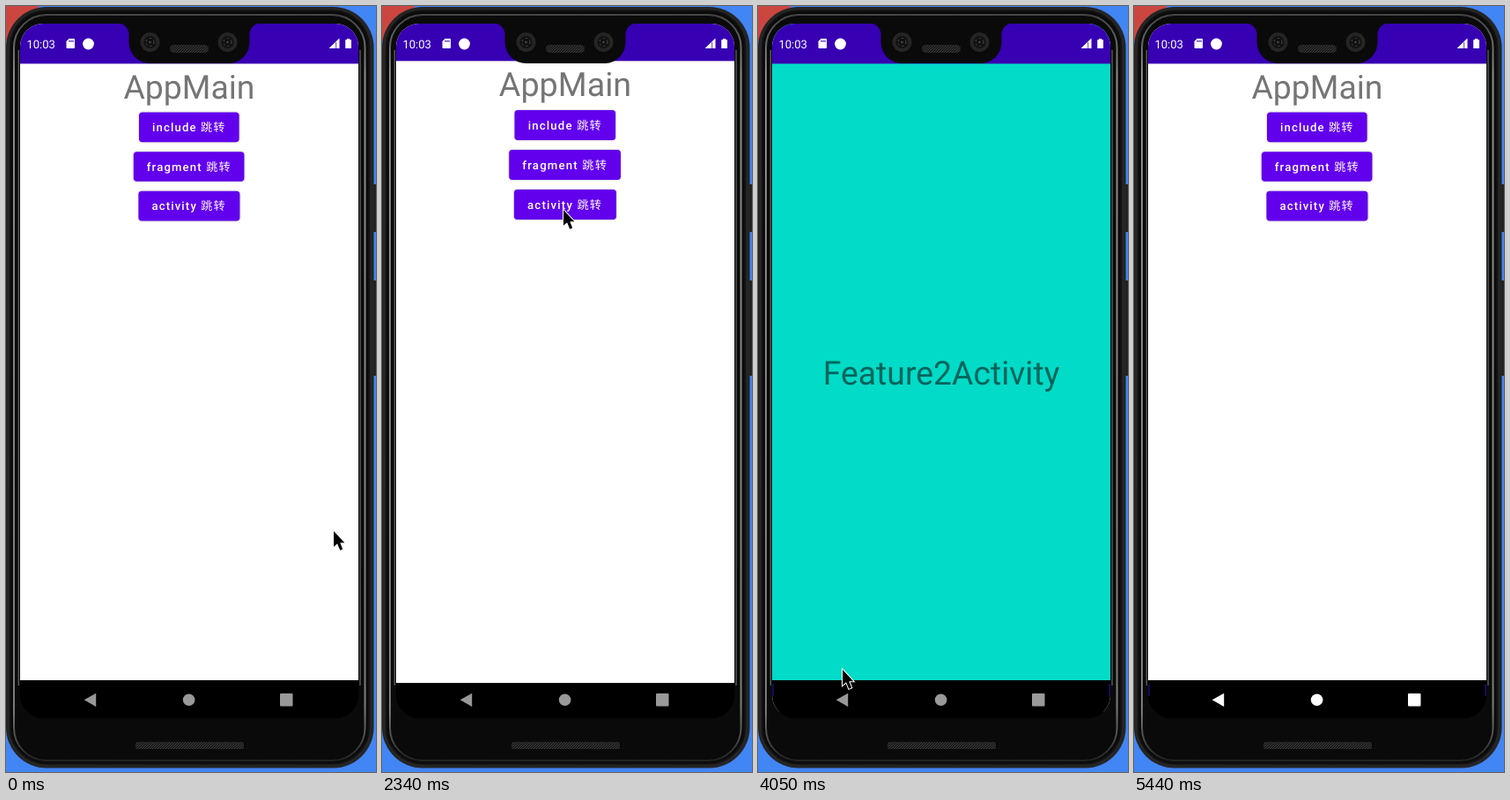
Recreate the animation shown at these times as an HTML page. Size 420 px wide and 868 px high, loop 6300 ms.

```html
<!DOCTYPE html>
<html lang="zh">
<head>
<meta charset="utf-8">
<title>AppMain</title>
<style>
html, body { margin: 0; height: 100%; overflow: hidden; background: #4285f4; }
svg { display: block; width: 100%; height: 100%; }
text { font-family: Roboto, "Noto Sans CJK SC", "Noto Sans CJK", sans-serif; text-rendering: geometricPrecision; }
.title { font-size: 37.37px; text-anchor: middle; fill: #000; fill-opacity: .54; }
.label { font-size: 13.08px; font-weight: 500; letter-spacing: 1.17px; fill: #fff; }
.button { fill: #6200ee; filter: drop-shadow(0 .8px .8px rgba(0, 0, 0, .3)); }
</style>
</head>
<body>
<svg viewBox="0 0 420 868">
  <defs>
    <clipPath id="screen"><rect x="16" y="20" width="384" height="787" rx="26"/></clipPath>
    <clipPath id="pressed"><rect x="150.4" y="210" width="115" height="33.6" rx="3.7"/></clipPath>
    <pattern id="mesh" width="3" height="3" patternUnits="userSpaceOnUse">
      <rect width="3" height="3" fill="#191919"/><path d="M0 3L3 0" stroke="#3c3c3c"/>
    </pattern>
    <linearGradient id="rim" x2="0" y2="1">
      <stop offset="0" stop-color="#444"/><stop offset=".08" stop-color="#8c8c8c"/>
      <stop offset=".93" stop-color="#7c7c7c"/><stop offset="1" stop-color="#222"/>
    </linearGradient>
  </defs>

  <!-- phone body -->
  <path d="M0 0H38L0 40Z" fill="#cc4640"/>
  <path d="M415 202H420V256H415ZM415 311H420V419H415Z" fill="#222"/>
  <rect x="0" y="1" width="417.5" height="862.5" rx="46" fill="#252525"/>
  <rect x="5" y="5.5" width="407" height="853" rx="41" fill="#0a0a0a" stroke="#111" stroke-width="2"/>
  <rect x="9" y="10" width="398.5" height="845" rx="37" fill="none" stroke="url(#rim)" stroke-width="2"/>
  <rect x="14" y="16" width="388" height="835" rx="31" fill="#0a0a0a"/>
  <path d="M14.3 50V770M402 50V770" stroke="#666" stroke-width="1.2"/>
  <rect x="147" y="834" width="123" height="8" rx="2" fill="url(#mesh)"/>

  <g clip-path="url(#screen)">
    <rect x="16" y="20" width="384" height="787"/>
    <g id="main">
      <rect x="16" y="20" width="384" height="745" fill="#fff"/>
      <rect x="16" y="20" width="384" height="45.4" fill="#3700b3"/>
      <rect x="16" y="764" width="384" height="43"/>
      <text class="title" x="208" y="104.6">AppMain</text>
      <g id="buttons"></g>
      <circle id="ripple" cx="206" cy="230" fill="#fff" clip-path="url(#pressed)"/>
    </g>
    <g id="feature">
      <rect x="16" y="20" width="384" height="745" fill="#01dbc7"/>
      <rect x="16" y="20" width="384" height="45.4" fill="#3700b3"/>
      <rect x="16" y="764" width="384" height="43"/>
      <text class="title" x="208" y="429.2">Feature2Activity</text>
    </g>
    <path id="corners" d="M16 768H18V782H16ZM398 768H400V782H398Z" fill="#160a55"/>
  </g>

  <!-- notch -->
  <path d="M127 19.5A12.5 12.5 0 0 1 139.5 32V41A24 24 0 0 0 163.5 65H252.5A24 24 0 0 0 276.5 41V32A12.5 12.5 0 0 1 289 19.5Z" fill="#0a0a0a"/>
  <g id="lenses"></g>
  <rect x="186" y="44" width="44" height="9" rx="4.5" fill="url(#mesh)"/>

  <!-- status bar -->
  <g fill="#fff">
    <text x="23.4" y="47.7" font-size="13.08">10:03</text>
    <path d="M71.5 37H77Q78 37 78 38V47Q78 48 77 48H69.5Q68.5 48 68.5 47V40Z"/>
    <path d="M72 38.5V41M74 38.5V41M76 38.5V41" stroke="#3700b3"/>
    <circle cx="93.5" cy="43" r="6.4"/>
    <path d="M366.5 48L378.5 36.5V48Z"/>
    <path d="M374.7 41V48" stroke="#3700b3" stroke-width=".8"/>
    <path d="M387 37H390V38.2H392V48H385.2V38.2H387Z"/>
  </g>

  <!-- navigation keys -->
  <g id="keys">
    <path d="M88.7 786.3L102.2 778.7V793.9Z"/>
    <circle cx="207.6" cy="786.3" r="6.8"/>
    <rect x="311" y="779" width="14.5" height="14.5" rx="1"/>
  </g>

  <path id="cursor" d="M0 0V17.8L4.1 14.2L7.2 21.7L10.2 20.5L7.3 13.2H12.3Z" stroke="#fff" stroke-width="2" paint-order="stroke"/>
</svg>
<script>
const $ = id => document.getElementById(id);
const clamp = v => Math.max(0, Math.min(1, v));
const LOOP = 6300, OPEN = 2311, CLOSE = 4648, ZOOM = 400;

// Bursts of screen updates: start, end, number of updates
const bursts = [
  [480, 1090, 9], [1180, 1410, 4], [1640, 1790, 3], [2190, 2670, 7],
  [3590, 4210, 9], [4280, 4910, 9], [4990, 4990, 1], [5220, 5440, 4]
];

// Pointer path: time, x, y
const path = [
  [404, 372, 595], [1090, 206, 231], [3512, 206, 231], [4055, 96, 752],
  [4210, 96, 779], [4440, 98, 784], [5146, 98, 784], [5367, 224, 831]
];

$('buttons').innerHTML = [
  ['include', 151, 113.6], ['fragment', 144.8, 125.6], ['activity', 150.4, 115]
].map(([name, x, w], i) => {
  const y = 120.6 + 44.6 * i;
  return `<rect class="button" x="${x}" y="${y}" width="${w}" height="33.6" rx="3.7"/>
    <text class="label" x="${x + 15}" y="${y + 21.6}">${name} 跳转</text>`;
}).join('');

$('lenses').innerHTML = [163.5, 251.5].map(x =>
  `<circle cx="${x}" cy="41" r="11" fill="#252525"/><circle cx="${x}" cy="41" r="7" fill="#111"/>
   <circle cx="${x}" cy="41" r="4.5" fill="none" stroke="#555" stroke-dasharray="2 3"/>
   <circle cx="${x}" cy="41" r="1.3" fill="#444"/>`).join('');

function snap(t) {
  let last = 0;
  for (const [a, b, n] of bursts) {
    if (t < a) break;
    const step = (b - a) / (n - 1) || 1;
    last = Math.min(b, a + step * Math.floor((t - a) / step + .2));
  }
  return last;
}

const bezier = (u, a, b, c, d) => {
  const v = 1 - u;
  return v * v * v * a + 3 * v * v * u * b + 3 * v * u * u * c + u * u * u * d;
};

// Fast out, extra slow in
function ease(p) {
  p = clamp(p);
  const [xs, ys] = p < .167
    ? [[0, .05, .133, .167], [0, 0, .06, .4]]
    : [[.167, .208, .25, 1], [.4, .82, 1, 1]];
  let lo = 0, hi = 1;
  for (let i = 0; i < 24; i++) {
    const mid = (lo + hi) / 2;
    if (bezier(mid, ...xs) < p) lo = mid; else hi = mid;
  }
  return bezier(lo, ...ys);
}

function pointer(t) {
  const i = path.findIndex(k => k[0] > t);
  if (i === 0) return path[0].slice(1);
  if (i < 0) return path.at(-1).slice(1);
  const [t0, x0, y0] = path[i - 1], [t1, x1, y1] = path[i];
  const p = (t - t0) / (t1 - t0), s = p * p * (3 - 2 * p);
  return [x0 + (x1 - x0) * s, y0 + (y1 - y0) * s];
}

const zoom = (id, s) =>
  $(id).setAttribute('transform', `translate(208 413.5) scale(${s}) translate(-208 -413.5)`);

function draw(t) {
  const open = ease((t - OPEN) / ZOOM), close = ease((t - CLOSE) / ZOOM);
  zoom('main', 1 + .1 * (open - close));
  zoom('feature', .85 + .15 * open - .1 * close);
  $('feature').setAttribute('opacity', clamp((t - OPEN - 50) / 50) - clamp((t - CLOSE - 35) / 50));
  $('corners').setAttribute('opacity', t > 2400 ? 1 : 0);

  const press = clamp((t - 1100) / 310);
  $('ripple').setAttribute('r', 66 * press);
  $('ripple').setAttribute('opacity', .24 * press * (1 - clamp((t - 1565) / 225)));

  const grey = 153 + 102 * clamp((t - 4200) / 240);
  $('keys').setAttribute('fill', `rgb(${grey},${grey},${grey})`);

  $('cursor').setAttribute('transform', `translate(${pointer(t)})`);
  $('cursor').setAttribute('opacity', t < 5440 ? 1 : 0);
}

const start = performance.now();
function tick() {
  draw(snap((performance.now() - start) % LOOP));
  requestAnimationFrame(tick);
}
tick();
</script>
</body>
</html>
```
